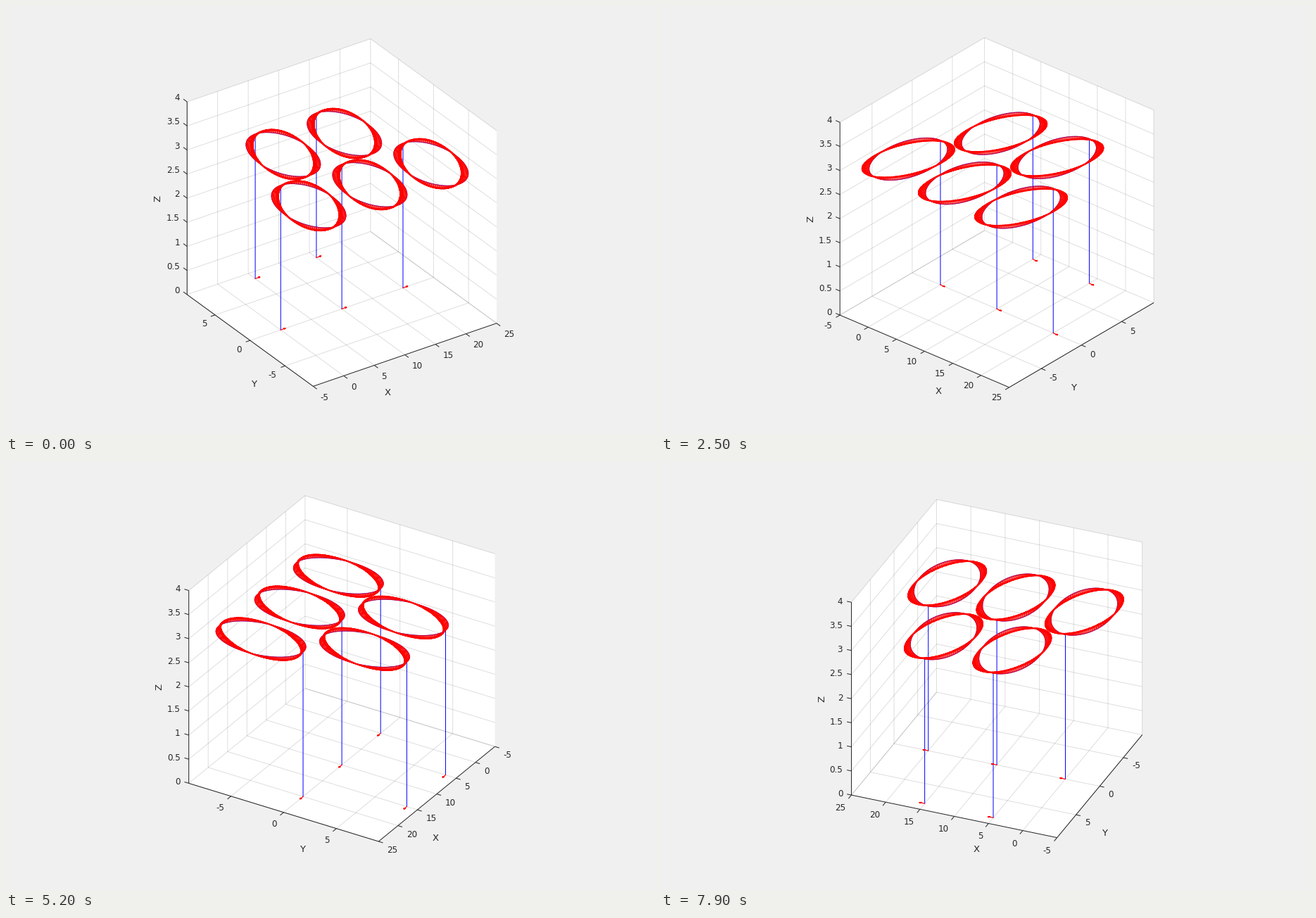
A matplotlib script that plays this animation: 922x608 px, repeating every 8 s.

```python
import numpy as np
import matplotlib.pyplot as plt
from matplotlib.animation import FuncAnimation
from matplotlib.collections import LineCollection
from matplotlib.patches import Polygon

W, H, DPI = 922, 608, 64
PX = 72 / DPI                      # one pixel in points
FRAMES, INTERVAL = 80, 100
CENTER = np.array([477.1, 293.4])
SIDE = 316.2                       # edge of the plot cube in pixels
ELEV = np.radians(30)

LO = np.array([-5.0, -9.0, 0.0])
HI = np.array([25.0, 9.0, 4.0])
TICKS = [np.arange(-5, 26, 5), np.arange(-5, 6, 5), np.arange(0, 4.1, 0.5)]
INK = (0.15, 0.15, 0.15)

HOMES = [(0, 0), (10, 0), (20, 0), (5, 8), (15, 8)]
RADIUS, ALT, ARROW, COUNT = 4, 3, 0.8, 200


def project(pts, az):
    """Orthographic projection of data points to pixel coordinates."""
    u = (np.asarray(pts, float) - (LO + HI) / 2) / (HI - LO) * SIDE
    x, y, z = u[..., 0], u[..., 1], u[..., 2]
    right = x * np.cos(az) + y * np.sin(az)
    away = y * np.cos(az) - x * np.sin(az)
    up = away * np.sin(ELEV) + z * np.cos(ELEV)
    return CENTER + np.stack([right, -up], axis=-1)


def unit(v):
    return v / np.hypot(*v)


def arrows(tail, angle):
    """Arrow outlines: shaft, then both strokes of the head."""
    d = np.stack([np.cos(angle), np.sin(angle), 0 * angle], axis=-1) * ARROW
    n = np.stack([-d[:, 1], d[:, 0], 0 * angle], axis=-1)
    tip = tail + d
    return np.stack([tail, tip, tip - 0.33 * d + 0.1 * n,
                     tip, tip - 0.33 * d - 0.1 * n], axis=1)


def build_flights():
    turn = np.linspace(0, 2 * np.pi, COUNT + 1)
    sticks, rings, marks = [], [], []
    for hx, hy in HOMES:
        ring = np.stack([hx - RADIUS * np.sin(turn),
                         hy - RADIUS + RADIUS * np.cos(turn),
                         ALT + 0 * turn], axis=-1)
        sticks.append([(hx, hy, 0), (hx, hy, ALT)])
        rings.append(ring)
        marks.append(arrows(np.array([[hx, hy, 0.0]]), np.zeros(1)))
        marks.append(arrows(ring, -turn))
    return np.array(sticks), np.array(rings), np.concatenate(marks)


STICKS, RINGS, MARKS = build_flights()

fig = plt.figure(figsize=(W / DPI, H / DPI), dpi=DPI, facecolor="#f0f0f0")
ax = fig.add_axes([0, 0, 1, 1])
ax.set(xlim=(0, W), ylim=(H, 0))
ax.axis("off")

pane = ax.add_patch(Polygon(np.zeros((6, 2)), fc="white", ec="none", zorder=1))


def lines(color, z, width=1, **kw):
    # Snapping off: upright lines keep their sub-pixel place.
    return ax.add_collection(
        LineCollection([], colors=[color], linewidths=width * PX, zorder=z,
                       snap=False, **kw),
        autolim=False)


grid = lines(INK + (0.15,), 2)
rulers = lines(INK, 3)
sticks = lines("blue", 4)
rings = lines("blue", 5)
marks = lines("red", 6, 1.15, joinstyle="bevel", capstyle="projecting")


def label(text, size, **kw):
    return ax.text(0, 0, text, size=size * PX, color=INK, va="baseline",
                   family="DejaVu Sans", zorder=7, **kw)


numbers = [[label(f"{v:g}", 12) for v in t] for t in TICKS]
names = [label("X", 13.2, ha="center"), label("Y", 13.2, ha="center"),
         label("Z", 13.2, ha="center", rotation=90, rotation_mode="anchor")]


def grid_lines(back):
    """Tick lines on the floor and the two far walls."""
    segs = []
    for face in range(3):
        for axis in range(3):
            if axis == face:
                continue
            other = 3 - face - axis
            for v in TICKS[axis]:
                a = np.zeros(3)
                a[face], a[axis], a[other] = back[face], v, LO[other]
                b = a.copy()
                b[other] = HI[other]
                segs.append((a, b))
    return np.array(segs)


def draw_axis(axis, near, far, az, segs):
    """Bottom ruler along x or y, with its numbers and name."""
    start, end, out = near.copy(), near.copy(), near.copy()
    start[axis] = far[axis]
    out[1 - axis] = far[1 - axis]
    p, q = project([start, end], az)
    direction = unit(q - project(out, az))
    segs.append((p, q))
    dx = direction[0]
    side = "left" if dx > 0.38 else "right" if dx < -0.38 else "center"
    for v, txt in zip(TICKS[axis], numbers[axis]):
        base = near.copy()
        base[axis] = v
        s = project(base, az)
        segs.append((s, s + 6.5 * direction))
        txt.set_position(s + 12.5 * direction + (0, 12.4))
        txt.set_ha(side)
    # The name hangs below the ruler, shifted toward the front corner.
    a = unit(q - p)
    perp = np.array([-a[1], a[0]]) * (1 if a[0] > 0 else -1)
    steep = abs(a[1])
    along = 40 + 21 * (max(0, steep - 0.6) / 0.367) ** 1.7
    drop = 32 + 40 * steep - 26 * steep ** 2
    names[axis].set_position((p + q) / 2 + along * a + drop * perp + (0, 4.8))


def draw_height(left, near, az, segs):
    bottom, top = project([(*left[:2], LO[2]), (*left[:2], HI[2])], az)
    direction = unit(bottom - project(near, az))
    segs.append((bottom, top))
    for v, txt in zip(TICKS[2], numbers[2]):
        s = project((*left[:2], v), az)
        segs.append((s, s + 6.5 * direction))
        txt.set_position(s + 11 * direction + (-1.5, 4.6))
        txt.set_ha("right")
    names[2].set_position((bottom + top) / 2 + (-38.2, 0.3))


def update(k):
    az = np.radians(-34.5 + 3 * k)
    x_up, y_up = np.sin(az) > 0, np.cos(az) < 0
    near = np.array([HI[0] if x_up else LO[0], HI[1] if y_up else LO[1], 0.0])
    far = LO + HI - near
    far[2] = 0.0

    sides = [np.array([near[0], far[1], 0]), np.array([far[0], near[1], 0])]
    left, right = sorted(sides, key=lambda c: project(c, az)[0])
    lift = np.array([0, 0, HI[2]])
    pane.set_xy(project([left, near, right, right + lift,
                         far + lift, left + lift], az))

    grid.set_segments(project(grid_lines(far), az))
    segs = []
    draw_axis(0, near, far, az, segs)
    draw_axis(1, near, far, az, segs)
    draw_height(left, near, az, segs)
    rulers.set_segments(segs)

    sticks.set_segments(project(STICKS, az))
    rings.set_segments(project(RINGS, az))
    marks.set_segments(project(MARKS, az))
    return []


anim = FuncAnimation(fig, update, frames=FRAMES, interval=INTERVAL,
                     repeat=True, repeat_delay=0, blit=False)
plt.show()
```
